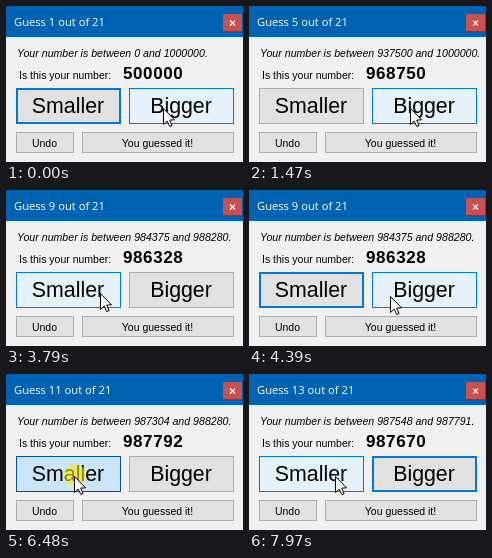
Write an HTML page with a canvas that moves like this. It is 237 px wide and 156 px high and loops after 8 s.

```html
<!DOCTYPE html>
<html lang="en">
<head>
<meta charset="utf-8">
<title>Guess the number</title>
<style>
  html, body { margin: 0; width: 237px; height: 156px; overflow: hidden; background: #f0f0f0; }
  canvas { display: block; }
</style>
</head>
<body>
<canvas id="stage" width="237" height="156"></canvas>
<script>
const ctx = document.getElementById('stage').getContext('2d');
const LOOP = 8000;
const STEP = 209; // ms between two pictures
const SANS = '"Liberation Sans", Arial, sans-serif';
const BLUE = '#0078d7';

const SMALLER = { x: 10, y: 82, w: 105, h: 36, label: 'Smaller', size: 21.33, base: 107 };
const BIGGER = { ...SMALLER, x: 123, label: 'Bigger' };
const UNDO = { x: 10, y: 126, w: 58, h: 21, label: 'Undo', size: 10.5, base: 141 };
const DONE = { ...UNDO, x: 76, w: 152, label: 'You guessed it!' };

// The pointer rests at each stop from step `from` to step `to`,
// with its clicks spread evenly over that time.
const stop = (x, y, from, to = from, clicks = 0) => ({ x, y, from, to, clicks });
const STOPS = [
  stop(157, 102, 0),
  stop(161, 102, 1, 10, 6),
  stop(76, 102, 13, 16, 2),
  stop(146, 106, 22, 22, 1),
  stop(119, 103, 25),
  stop(140, 103, 27, 27, 1),
  stop(68, 102, 31, 31, 1),
  stop(140, 103, 35, 35, 1),
  stop(86, 102, 38)
];

const smooth = u => u * u * (3 - 2 * u);
const inside = (b, p) => p.x >= b.x && p.x < b.x + b.w;

const CLICKS = STOPS.flatMap(s => Array.from({ length: s.clicks }, (_, k) => ({
  step: Math.round(s.from + (s.to - s.from) * k / Math.max(1, s.clicks - 1)),
  button: inside(BIGGER, s) ? BIGGER : SMALLER
})));

function pointerAt(step) {
  const i = STOPS.findIndex(s => step <= s.to);
  const b = STOPS[i];
  if (step >= b.from) return { x: b.x, y: b.y };
  const a = STOPS[i - 1];
  const k = smooth((step - a.to) / (b.from - a.to));
  return { x: Math.round(a.x + (b.x - a.x) * k), y: Math.round(a.y + (b.y - a.y) * k) };
}

// Replay the search; a click takes effect one step after the press.
function gameAt(step) {
  const game = { low: 0, high: 1000000, guess: 500000, count: 1, focus: SMALLER, pressed: false };
  for (const click of CLICKS) {
    if (click.step > step) break;
    game.focus = click.button;
    game.pressed = click.step === step;
    if (game.pressed) break;
    if (click.button === BIGGER) game.low = game.guess;
    else game.high = game.guess - 1;
    game.guess = Math.round((game.low + game.high) / 2);
    game.count++;
  }
  return game;
}

function rect(x, y, w, h, color) {
  ctx.fillStyle = color;
  ctx.fillRect(x, y, w, h);
}

function text(str, x, y, font, color = '#000', align = 'left') {
  ctx.font = font;
  ctx.fillStyle = color;
  ctx.textAlign = align;
  ctx.fillText(str, x, y);
}

function button(b, state, focused) {
  let fill = '#e1e1e1', edge = '#adadad', line = 1;
  if (state === 'pressed') { fill = '#cce4f7'; edge = '#005499'; }
  else if (state === 'hover') { fill = '#e5f1fb'; edge = BLUE; }
  else if (focused) { edge = BLUE; line = 2; }
  rect(b.x, b.y, b.w, b.h, edge);
  rect(b.x + line, b.y + line, b.w - 2 * line, b.h - 2 * line, fill);
  text(b.label, b.x + b.w / 2 - 0.5, b.base, `${b.size}px ${SANS}`, '#000', 'center');
}

function halo(p) {
  ctx.fillStyle = 'rgba(255, 240, 0, 0.57)';
  ctx.beginPath();
  ctx.arc(p.x + 1, p.y - 1, 11, 0, Math.PI * 2);
  ctx.fill();
}

function arrow(p) {
  const outline = [[0, 0], [0, 16], [3.7, 12.6], [6.3, 18], [8.6, 17], [6.2, 11.6], [11, 11.3]];
  ctx.beginPath();
  outline.forEach(([x, y]) => ctx.lineTo(p.x + x + 0.5, p.y + y + 0.5));
  ctx.closePath();
  ctx.fillStyle = '#fff';
  ctx.fill();
  ctx.strokeStyle = '#000';
  ctx.lineWidth = 1;
  ctx.stroke();
}

function titleBar(count) {
  rect(0, 0, 237, 31, '#0063b1');
  text(`Guess ${count} out of 21`, 8, 20, '11.2px "Open Sans", "Noto Sans", sans-serif', '#fff');
  rect(217, 8, 19, 17, '#c75050');
  ctx.strokeStyle = '#fff';
  ctx.lineWidth = 1.1;
  ctx.beginPath();
  ctx.moveTo(224, 14.5); ctx.lineTo(229, 19.5);
  ctx.moveTo(229, 14.5); ctx.lineTo(224, 19.5);
  ctx.stroke();
}

function draw(step) {
  const game = gameAt(step);
  const pointer = pointerAt(step);
  rect(0, 0, 237, 156, '#f0f0f0');
  titleBar(game.count);
  text(`Your number is between ${game.low} and ${game.high}.`, 11, 51, `italic 10.6px ${SANS}`);
  text('Is this your number:', 13, 73, `10.5px ${SANS}`);
  ctx.letterSpacing = '0.6px';
  text(game.guess, 117, 73, `bold 17px ${SANS}`);
  ctx.letterSpacing = '0px';
  for (const b of [SMALLER, BIGGER]) {
    const state = !inside(b, pointer) ? 'idle' : game.pressed ? 'pressed' : 'hover';
    button(b, state, game.focus === b);
  }
  button(UNDO);
  button(DONE);
  if (game.pressed) halo(pointer);
  arrow(pointer);
}

const start = performance.now();
function tick() {
  const t = (performance.now() - start) % LOOP;
  draw(Math.floor(t / STEP));
  requestAnimationFrame(tick);
}
tick();
</script>
</body>
</html>
```
